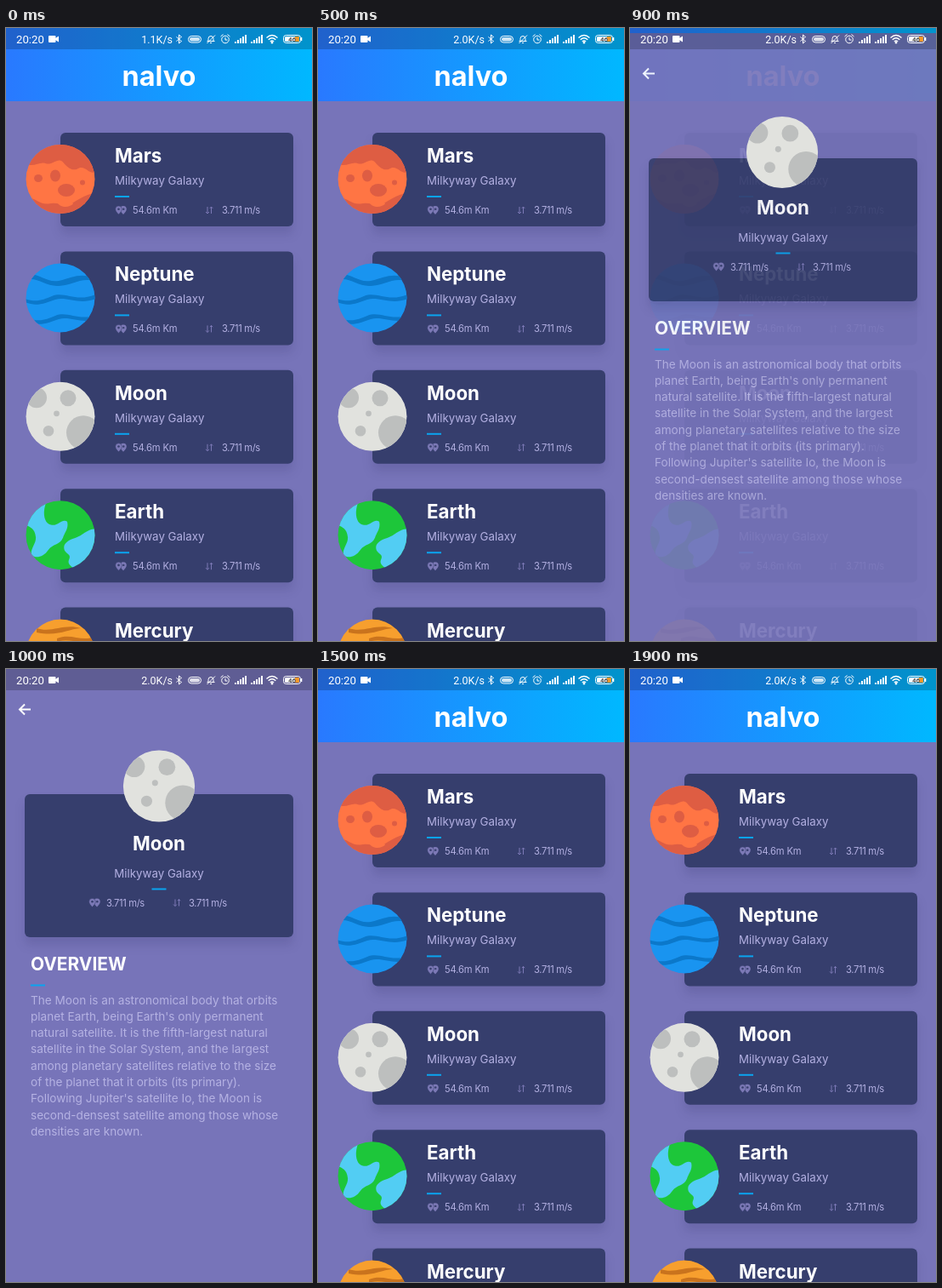
Recreate the animation shown at these times as an HTML page. Size 360 by 720 pixels, loop 2 s.

```html
<!DOCTYPE html>
<html lang="en">
<head>
<meta charset="utf-8">
<title>Planets</title>
<style>
  html, body { margin: 0; width: 100%; height: 100%; overflow: hidden; background: #7774b9; }
  svg { display: block; width: 360px; height: 720px; font-family: Inter, sans-serif; }
  .name { font-size: 22.3px; font-weight: 700; fill: #fff; }
  .brand { font-size: 32.5px; font-weight: 700; fill: #fff; text-anchor: middle; }
  .sub { font-size: 13.3px; fill: #b3b0e2; }
  .stat { font-size: 11.2px; letter-spacing: -.15px; fill: #b3b0e2; }
  .speed { letter-spacing: -.35px; }
  .heading { font-size: 20.9px; font-weight: 700; fill: #fff; }
  .body { font-size: 13.6px; fill: #b5b2e3; }
  .mid { text-anchor: middle; }
  .accent { fill: #0aa4ef; }
  .card { fill: #363e6d; filter: drop-shadow(0 9px 6px rgba(30, 30, 80, .14)); }
  .system { font: 13.2px Roboto, sans-serif; fill: #fff; }
  .line { fill: none; stroke: #fff; }
</style>
</head>
<body>
<svg viewBox="0 0 360 720">
  <defs>
    <linearGradient id="sky"><stop stop-color="#2979ff"/><stop offset="1" stop-color="#00b8ff"/></linearGradient>
    <clipPath id="disc"><circle r="40.5"/></clipPath>

    <g id="Mars" clip-path="url(#disc)">
      <circle r="41" fill="#ff7544"/>
      <g fill="#de5d43">
        <path d="M-42-42H42V-9C34-4 30-16 22-13C14-8 8-14 3-20C-3-26-8-17-16-18C-24-22-30-13-42-18Z"/>
        <path d="M-42 22C-30 20-26 30-14 29C-4 26 2 32 12 29C22 24 28 18 42 16V42H-42Z"/>
        <ellipse cx="-26" cy="-1" rx="5" ry="4.5"/><ellipse cx="-6" cy="-4" rx="6" ry="7"/>
        <ellipse cx="7" cy="13" rx="10" ry="7.5"/><circle cx="26" cy="4" r="3"/>
      </g>
      <path d="M-4 27C3 20 12 22 15 29C10 34 0 34-4 27Z" fill="#ff7544"/>
    </g>

    <g id="Neptune" clip-path="url(#disc)">
      <circle r="41" fill="#1994f0"/>
      <g fill="#0b78ca">
        <path d="M-42-26C-26-32-18-17-2-20C16-24 22-30 42-23V-19C24-25 14-14-2-14C-18-13-26-25-42-21Z"/>
        <path id="wave" d="M-42 1C-28 6-20 2-10-2C6-8 18 6 42-4V1C22 9 8-2-6 2C-18 6-28 11-42 5Z"/>
        <use href="#wave" x="4" y="23"/>
      </g>
    </g>

    <g id="Moon" clip-path="url(#disc)">
      <circle r="41" fill="#e1e2de"/>
      <g fill="#bdbfbe">
        <circle cx="-28" cy="-22" r="12"/><circle cx="9" cy="-21.5" r="9.5"/><circle cx="-4.5" cy="-3.5" r="3.4"/>
        <circle cx="-14" cy="17" r="6.3"/><circle cx="27" cy="19" r="20"/>
      </g>
    </g>

    <g id="Earth" clip-path="url(#disc)">
      <circle r="41" fill="#1dc63a"/>
      <g fill="#52cdf3">
        <path d="M-42-12L-30-36L-17-38C-22-24-18-12-10-12C-2-11 2-20 8-16C10-8 5-3 3 3C-1 12-9 10-14 17C-20 26-28 27-34 24C-36 16-28 10-29 2C-30-8-36-10-42-12Z"/>
        <path d="M42-7C32-8 26 1 18 3C8 6 2 11 5 18C8 23 13 22 10 29C8 34 13 37 18 40H42Z"/>
      </g>
    </g>

    <g id="Mercury" clip-path="url(#disc)">
      <circle r="41" fill="#f79f2e"/>
      <path d="M-28-30C-10-24 4-36 24-30C8-29-2-20-28-25ZM-4-18C12-25 24-14 40-20V-14C24-10 10-20-4-14ZM-42-14C-28-18-22-8-8-10C-18-4-30-10-42-7Z" fill="#c9731d"/>
    </g>

    <g id="pins">
      <g fill="#7c79b6">
        <path id="pin" d="M3-5a3.8 3.8 0 0 1 3.8 3.8C6.8 1 4.8 3.2 3 5C1.2 3.2-.8 1-.8-1.2A3.8 3.8 0 0 1 3-5Z"/>
        <use href="#pin" x="-5.5" stroke="#363e6d" stroke-width=".5"/>
      </g>
      <g fill="#363e6d"><circle cx="-2.5" cy="-1.3" r="1.3"/><circle cx="3.3" cy="-1.3" r="1.2"/></g>
    </g>
    <path id="arrows" d="M-2-4V4M-4 2L-2 4L0 2M2.5 4V-4M.8-2.2L2.5-4L4.2-2.2" fill="none" stroke="#7c79b6"/>
    <path id="bars" d="M0 18v-2h2v2zM3 18v-4h2v4zM6 18v-6h2v6zM9 18v-8h2v8zM12 18V8h2v10z"/>
  </defs>

  <g id="list"></g>
  <g id="detail"></g>
  <use id="traveller" href="#Moon"/>

  <rect width="360" height="25" opacity=".2"/>
  <g class="system">
    <text x="12" y="18">20:20</text>
    <text id="rate" x="196" y="17.5" text-anchor="end" font-size="12.5"></text>
    <rect x="50" y="9" width="8.5" height="8" rx="1"/><path d="M58 12l4-2.5v7L58 14z"/>
    <path class="line" d="M200.500 10.500l6 5l-3 2.500V8l3 2.500l-6 5"/>
    <rect class="line" x="214.500" y="9.500" width="15" height="7.500" rx="3.700"/><rect x="216" y="11" width="12" height="4.500" rx="2.200" opacity=".8"/>
    <path class="line" d="M236.500 15.500h9M238 15.500v-3a3 3 0 0 1 6 0v3M240 17.500h2M236.500 18L246 8.500"/>
    <circle class="line" cx="258" cy="13.500" r="4.300"/><path class="line" d="M258 11v3h2.500M252.500 10l3-2.500M263.500 10l-3-2.500"/>
    <use href="#bars" x="269"/><use href="#bars" x="288"/>
    <path class="line" d="M306.500 11.500q6.500-6 13 0M308.700 13.700q4.300-4 8.600 0M310.900 15.900q2.100-2 4.200 0" stroke-width="1.4"/><circle cx="313" cy="17.300" r="1.200"/>
    <rect class="line" x="326.500" y="8.500" width="20" height="9" rx="3"/><rect x="328" y="10" width="17" height="6" rx="1.500"/>
    <path d="M340 10h4a1 1 0 0 1 1 1v4a1 1 0 0 1-1 1h-4z" fill="#f5982a"/><rect x="347" y="11" width="1.300" height="4"/>
    <text x="336.500" y="16" font-size="8" font-weight="700" text-anchor="middle" fill="#555">46</text>
  </g>
</svg>
<script>
const $ = id => document.getElementById(id);

const text = (cls, x, y, value) => `<text class="${cls}" x="${x}" y="${y}">${value}</text>`;
const icon = (id, x, y) => `<use href="#${id}" x="${x}" y="${y}"/>`;
const accent = (x, y) => `<rect class="accent" x="${x}" y="${y}" width="17" height="2"/>`;

const planetCard = (name, i) => `<g transform="translate(0 ${123 + i * 139.4})">
  <rect class="card" x="64" width="274" height="110" rx="6"/>
  <g id="row${name}">${icon(name, 64, 54.5)}</g>
  ${text("name", 128, 35, name)}${text("sub", 128, 61, "Milkyway Galaxy")}${accent(128, 74)}
  ${icon("pins", 135, 91)}${text("stat", 149, 95, "54.6m Km")}
  ${icon("arrows", 239, 91)}${text("stat speed", 254, 95, "3.711 m/s")}</g>`;

$("list").innerHTML = `<rect width="360" height="720" fill="#7774b9"/>
  <rect width="360" height="86" fill="url(#sky)"/>${text("brand", 180, 68, "nalvo")}` +
  ["Mars", "Neptune", "Moon", "Earth", "Mercury"].map(planetCard).join("");

const overview = [
  "The Moon is an astronomical body that orbits",
  "planet Earth, being Earth's only permanent",
  "natural satellite. It is the fifth-largest natural",
  "satellite in the Solar System, and the largest",
  "among planetary satellites relative to the size",
  "of the planet that it orbits (its primary).",
  "Following Jupiter's satellite Io, the Moon is",
  "second-densest satellite among those whose",
  "densities are known."
];

$("detail").innerHTML = `<rect width="360" height="720" fill="#7774b9"/>
  <path d="M29 47.5H16M22 41.5L16 47.5L22 53.5" class="line" stroke-width="2"/>
  <rect class="card" x="22" y="147" width="316" height="168" rx="6"/>
  ${text("name mid", 180, 213, "Moon")}${text("sub mid", 180, 245, "Milkyway Galaxy")}${accent(171.5, 257.5)}
  ${icon("pins", 104, 274.5)}${text("stat speed", 118, 279, "3.711 m/s")}
  ${icon("arrows", 201, 274.5)}${text("stat speed", 215, 279, "3.711 m/s")}
  ${text("heading", 29, 354, "OVERVIEW")}${accent(29, 370.5)}` +
  overview.map((line, i) => text("body", 29, 393.5 + i * 19.3, line)).join("");

// Screen transition, held in 100 ms steps: start, slide, opacity, moon x, moon y
const poses = [
  [0, 50, 0, 64, 456.3],
  [800, 40, .3, 174, 214],
  [900, 6, .92, 179, 146],
  [1000, 0, 1, 180, 137.5],
  [1400, 6, .68, 173, 146],
  [1500, 50, 0, 64, 456.3]
];

function draw(now) {
  const t = now % 2000;
  const [, slide, opacity, x, y] = poses.findLast(pose => pose[0] <= t);
  const open = opacity > 0;
  $("rate").textContent = t < 300 ? "1.1K/s" : "2.0K/s";
  $("detail").setAttribute("transform", `translate(0 ${slide})`);
  $("detail").setAttribute("opacity", opacity);
  $("rowMoon").setAttribute("visibility", open ? "hidden" : "visible");
  $("traveller").setAttribute("visibility", open ? "visible" : "hidden");
  $("traveller").setAttribute("transform", `translate(${x} ${y}) scale(1.04)`);
  requestAnimationFrame(() => draw(performance.now()));
}
draw(performance.now());
</script>
</body>
</html>
```
